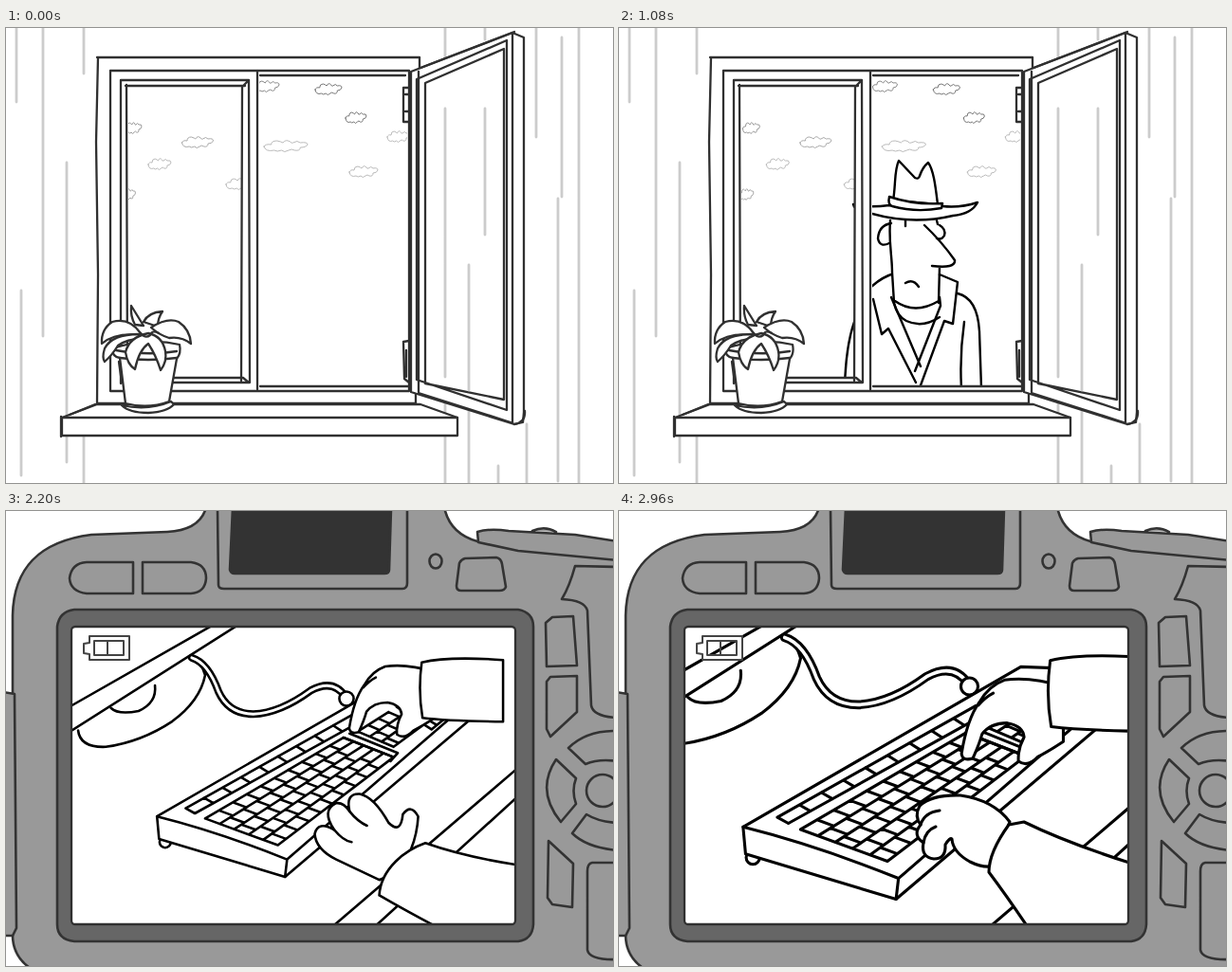
An HTML page that plays this animation: 640 px wide and 480 px high, repeating every 3.04 s.

```html
<!DOCTYPE html>
<html lang="en">
<head>
<meta charset="utf-8">
<title>Window watcher</title>
<style>
html, body { margin: 0; width: 100%; height: 100%; overflow: hidden; background: #fff; }
svg { display: block; width: 640px; height: 480px; }
path, rect, circle, ellipse { stroke-linecap: round; stroke-linejoin: round; }
.line { fill: none; }
.ink { stroke: #000; stroke-width: 2.4; fill: #fff; }
.frame { stroke: #303030; stroke-width: 2.3; fill: none; }
.white { fill: #fff; }
.wall { stroke: #ccc; stroke-width: 2.8; fill: none; }
.body { stroke: #333; stroke-width: 2.6; fill: #999; }
.thick { stroke-width: 3.1; }
text { font: bold 18px "DejaVu Sans Mono", "Noto Sans Mono", monospace; letter-spacing: -.8px; fill: #3a3a3a; }
</style>
</head>
<body>
<svg viewBox="0 0 640 480">
<defs>
  <clipPath id="panes"><path d="M129 62H249V368H129zM267 51H423V377H267z"/></clipPath>
  <clipPath id="reach"><path d="M267 51H600V377H267z"/></clipPath>
  <clipPath id="lcd"><rect x="69" y="123" width="468" height="313" rx="4"/></clipPath>
</defs>

<g id="room">
  <rect width="640" height="480" fill="#fff"/>
  <path class="wall" d="M11 0V78M39 0V325M64 142V458M16 277V472M82 0V48M82 430V480M463 0V480M488 250V480M505 0V12M505 85V218M519 462V480M549 418V480M559 0V115M586 10V178M582 180V478M604 0V480"/>
  <path fill="#fff" d="M96 31H436V396H96z"/>
  <g clip-path="url(#panes)">
    <g id="clouds"></g>
    <g id="standing" class="ink">
      <path d="M290 259Q250 272 246 308Q238 340 238 385H382L380 318Q378 285 357 280L338 260z" stroke="none"/>
      <path class="line" d="M290 259Q276 263 264 275M252 300Q239 328 238 380M357 280Q378 285 380 320L382 380M364 310Q359 345 361 380"/>
      <path d="M286 203C284 225 288 240 288 258L290 290Q293 304 303 309Q320 317 337 305L338 252L350 250L354 245L340 200z" stroke="none"/>
      <path d="M287 206Q274 208 273 222Q275 232 285 227M338 208Q345 212 343 219Q340 224 335 222"/>
      <path class="line" d="M286 203C284 225 288 240 288 258L290 290M302 203v6M335 203l1 4M322 208Q340 225 354 245Q355 254 330 251M338 252L337 290M302 269Q310 264 316 273M291 288Q312 303 337 288M290 290Q293 304 303 309Q320 317 338 305"/>
      <path class="line" d="M287 284L318 357M268 286L277 323L284 317L313 374M338 260L357 268L352 312L343 309L318 377M338 284L339 293L312 362"/>
      <path d="M247 186Q262 190 285 187L341 188Q360 190 378 184Q372 196 352 198Q310 208 267 196Q248 193 247 186z"/>
      <path d="M289 182C292 165 290 150 295 140L312 158Q316 160 317 156Q320 147 326 142C332 150 334 170 336 186z"/>
      <path d="M285 178Q283 186 288 188Q313 195 340 190L341 185Q312 187 285 178z"/>
    </g>
    <g id="hunched" class="ink">
      <path d="M300 262Q275 285 262 306V385H378L382 340L360 262z" stroke="none"/>
      <path class="line" d="M300 268L279 282V293M290 276Q276 286 264 304M382 348L378 380M311 348L326 363M318 377L348 335L365 341L345 357L330 377M346 306L318 377"/>
      <path d="M306 214H360V268H308L305 244Q293 243 291 234Q293 228 291 226Q293 217 306 218z"/>
      <path d="M250 196Q285 204 303 203L358 206Q378 207 399 206Q396 215 385 217H325Q290 215 250 202z"/>
      <path d="M308 199C311 180 312 165 316 155Q325 165 333 173Q339 166 346 159Q354 175 354 204z"/>
      <path d="M303 196Q302 204 306 205Q330 210 358 207L358 201Q330 203 303 196z"/>
    </g>
  </g>

  <g class="frame">
    <path d="M96 31H436V42M97 31L95 120L97 260L96 396H432V386M110 45H425V383H110zM265 45V381M121 55V375M121 55H256L257 374H165M127 60L128 372M126 61H252M249 62L248 372M160 369H250L256 374M249 62L256 55M268 50H421M268 378H424"/>
    <path d="M419 63H425M419 63V99H425M421 70H425M421 88H425M419 331L425 330M419 331L420 370L425 374M422 340V368"/>
    <path class="white" d="M427 46L534 5L546 10V405L545 416L536 418L427 384z"/>
    <path d="M534 5V417M536 418Q548 416 547 404M437 42L536 4M435 385L532 416"/>
    <path d="M433 54L528 13V403L433 371zM442 58L525 22V392L442 375zM435 46V384"/>
    <path class="white" d="M96 397L59 411V430H476V411L437 397z"/>
    <path d="M59 411H476M58 410V431M67 408L94 397"/>
  </g>
  <path class="wall" d="M463 85V368M488 250V382M505 85V218"/>

  <g class="frame white">
    <path d="M112 338Q112 347 120 348L126 396Q150 402 172 394L180 349Q185 343 183 334Q150 326 112 338z"/>
    <path d="M120 348Q150 352 180 348M116 340Q150 346 180 341M119 352L122 374"/>
    <path d="M122 398Q150 404 174 394L177 397Q170 405 150 406Q130 406 122 398z"/>
    <path d="M145 314L132 293Q131 304 136 313zM145 310Q150 300 165 299Q160 306 160 315z"/>
    <path d="M142 322Q130 305 112 310Q100 318 101 333Q115 321 142 324z"/>
    <path d="M140 323Q112 323 104 338Q101 348 104 352Q112 345 118 335Q128 328 142 328z"/>
    <path d="M153 316Q170 305 182 310Q194 318 195 333Q185 325 172 327Q162 324 153 316z"/>
    <path d="M150 322Q130 326 126 342Q128 355 136 360Q140 340 150 333Q158 345 163 361Q170 352 168 341Q165 325 150 322z"/>
    <path d="M142 322Q147 328 152 324Q154 318 161 322" fill="none"/>
  </g>

  <g clip-path="url(#reach)">
    <g id="camera" class="ink">
      <path d="M354 214L390 217V262L382 278H358z"/>
      <g id="lens">
        <path d="M388 230H374Q367 232 369 245Q372 258 388 256z"/>
        <path d="M375 234Q371 244 377 254" class="line"/>
        <path d="M392 221Q384 230 386 247Q387 260 394 265L408 268L412 218z"/>
        <path d="M410 218L440 215Q457 219 457 240Q454 272 435 276L410 270Q400 255 403 234z"/>
        <ellipse cx="437" cy="245" rx="18" ry="30" transform="rotate(6 437 245)"/>
        <ellipse cx="436" cy="245" rx="12" ry="25" transform="rotate(6 436 245)"/>
        <path d="M419 218Q408 244 419 271" class="line"/>
      </g>
      <path d="M355 282Q378 277 400 268L415 335Q404 349 385 347Q369 344 365 337Q357 312 355 282z"/>
      <path d="M310 246Q300 282 288 311Q275 304 264 314V328Q274 346 296 345Q326 343 340 326Q350 300 355 262L330 262z"/>
      <path d="M318 256Q318 232 328 215Q338 204 353 207Q354 214 345 219Q358 218 357 227Q359 235 353 239Q358 252 347 254Q340 256 342 264Q330 268 318 256z"/>
      <path class="line" d="M352 222Q336 222 330 233M354 237Q340 234 333 245M316 247L310 266"/>
    </g>
  </g>
</g>

<g id="back">
  <rect width="640" height="480" fill="#fff"/>
  <g class="body">
    <path d="M28 484Q6 470 7 445V110C8 60 35 32 90 25L170 22Q205 20 211-4H462Q468 24 497 32L645 48V484z"/>
    <path d="M-3 191L9 193L11 440L7 448H-3z"/>
    <path d="M555 21Q568 15 580 22M497 22Q510 18 530 21L600 25L645 32V52L540 42L498 33z"/>
    <path d="M223-3L224 78Q224 82 230 82H418Q423 82 423 76V-3"/>
    <path d="M239-3L236 62Q237 66 241 66H399Q404 66 404 62L406-3" fill="#333"/>
    <path d="M134 54V87H85Q68 85 67 71Q69 55 85 54zM144 54H195Q211 56 211 71Q210 86 195 87H144z"/>
    <ellipse cx="453" cy="53" rx="6.5" ry="7.5"/>
    <path d="M484 50L517 49Q522 50 523 56L527 80Q526 84 520 84H480Q475 84 475 79L478 55Q480 51 484 50z"/>
    <path d="M645 59L600 58Q594 80 586 93Q610 94 613 105L617 205Q619 217 645 218"/>
    <path d="M576 112L598 111L602 163L570 164L569 118zM574 175L602 174V212L574 238L570 230V180z"/>
    <path d="M593 250Q612 231 645 232V264Q625 261 611 267zM580 262L601 282Q596 295 601 309L585 328Q558 295 580 262zM597 340L612 320Q625 328 645 329V358Q612 355 597 340z"/>
    <circle cx="629" cy="295" r="17"/>
    <path d="M572 348L598 372L597 418L576 415L571 408zM645 371H618Q613 372 613 380V463Q615 474 645 473"/>
    <path fill="#666" d="M72 104H540Q556 107 556 122V436Q555 452 540 454H72Q54 452 54 436V122Q56 106 72 104z"/>
  </g>
  <rect x="69" y="122" width="468" height="314" rx="4" fill="#fff"/>
  <g clip-path="url(#lcd)">
    <g id="desk" class="ink">
      <path class="line" d="M30 270L290 105M30 242L265 108M300 461L537 258L570 230M335 469L537 285L570 255"/>
      <path class="line" d="M206 164Q213 166 217 180Q212 205 185 225Q155 245 120 250Q95 251 93 234M168 190Q170 207 152 215Q132 219 125 212"/>
      <path class="line" id="cord" d="M204 163Q220 168 230 196Q240 218 264 218Q290 217 320 195Q342 183 354 201" stroke-width="7.5"/>
      <path class="line" d="M204 163Q220 168 230 196Q240 218 264 218Q290 217 320 195Q342 183 354 201" stroke="#fff" style="stroke:#fff;stroke-width:2.8"/>
      <circle cx="355" cy="203" r="7"/>
      <circle cx="178" cy="343" r="5.5"/>
      <path d="M170 318L397 187L482 190V218L295 377L172 340z"/>
      <path d="M170 318Q230 333 297 360L462 217M297 360L295 377" class="line"/>
      <path id="keys" class="line"/>
      <path class="line" d="M358 237L405 256M352 241L401 260M405 256L398 264"/>
    </g>
    <g id="lowA" class="ink">
      <path d="M387 380L345 360Q325 350 324 335Q327 322 343 331Q330 312 345 305Q352 304 358 313Q354 295 368 296Q382 299 396 324Q408 336 410 316Q418 305 425 318Q424 335 418 350L405 372z"/>
      <path class="line" d="M343 331Q352 342 360 343M358 313Q366 323 375 327"/>
      <path d="M387 395Q388 377 403 362Q415 350 432 344Q480 361 550 369V450H490Q430 420 387 395z"/>
    </g>
    <g id="lowB" class="ink thick">
      <path d="M412 328Q395 305 360 300Q330 299 317 311Q311 322 318 331Q309 342 321 350Q318 365 332 367Q345 367 344 352Q349 344 351 346Q352 360 370 370Q382 376 392 375z"/>
      <path class="line" d="M318 331Q322 318 338 316M321 350Q323 337 334 333"/>
      <path d="M390 381Q390 360 411 331L427 328Q480 354 570 381V460H445Q414 413 390 381z"/>
    </g>
    <g id="upA" class="ink">
      <path d="M442 156L402 157Q382 160 383 167L379 179Q370 190 368 200Q357 212 359 219Q364 223 370 218Q380 211 386 202Q396 193 404 197Q403 202 398 206Q398 216 407 214L415 205Q416 216 428 222Q437 228 438 212z"/>
      <path class="line" d="M383 167Q390 164 396 166M379 183Q388 178 391 181M404 202Q412 203 413 208"/>
      <path d="M439 154Q490 148 550 166V246Q500 222 435 213Q439 182 439 154z"/>
    </g>
    <g id="upB" class="ink thick">
      <path id="palm" d="M475 163Q440 152 412 156Q395 162 385 180Q372 198 366 235Q367 243 378 240Q385 225 388 214Q397 202 415 202Q432 205 433 217Q426 230 427 243Q437 250 448 238Q460 232 475 222zM384 183Q392 174 400 170"/>
      <path id="cuff" d="M466 154Q500 146 570 151V230Q500 229 467 225Q461 190 466 154z"/>
    </g>
  </g>
  <rect x="69" y="122" width="468" height="314" rx="4" class="frame"/>
  <path d="M88 132H130V157H88V151L82 150V140L88 139zM93 137V152H124V137z" fill="#fff" fill-rule="evenodd" stroke="#444" stroke-width="2"/>
  <path d="M107 137V152" stroke="#444" stroke-width="2"/>
  <g id="rec">
    <rect x="479" y="137.500" width="8" height="7.500" rx="2" fill="none" stroke="#3a3a3a" stroke-width="2.2"/>
    <text x="496" y="148">REC</text>
  </g>
</g>
</svg>

<script>
const LOOP = 3040, STEP = 40, CUT = 1720;
const $ = id => document.getElementById(id);
const show = (id, on) => $(id).setAttribute('display', on ? 'inline' : 'none');
const place = (id, value) => $(id).setAttribute('transform', value);
const shift = (id, [x, y]) => place(id, `translate(${x} ${y})`);

// Piecewise linear track of [time, ...values]
function track(rows, t) {
  if (t <= rows[0][0]) return rows[0].slice(1);
  for (let i = 1; i < rows.length; i++) {
    const a = rows[i - 1], b = rows[i];
    if (t <= b[0]) {
      const k = (t - a[0]) / (b[0] - a[0]);
      return a.slice(1).map((v, j) => v + (b[j + 1] - v) * k);
    }
  }
  return rows[rows.length - 1].slice(1);
}

// x, y, width, grey
const clouds = [
  [134, 106, 18, '#999'], [202, 121, 33, '#aaa'], [162, 144, 24, '#bbb'], [246, 165, 28, '#bbb'],
  [129, 176, 15, '#aaa'], [275, 62, 26, '#888'], [340, 65, 28, '#777'], [369, 95, 22, '#777'],
  [295, 125, 46, '#bbb'], [414, 115, 24, '#bbb'], [377, 152, 30, '#bbb']
];
const puff = 'M-15 0q1-3 5-2q0-4 4-4q3 1 4 2q2-4 5-1q1 2 2 1q3-3 5 0q5-1 5 2q-1 3-5 3q0 4-4 3q-2-2-4 0q-3 3-5 0q-3 2-5 0q-6 2-7-4z';
$('clouds').innerHTML = clouds.map(([x, y, w, c]) =>
  `<path d="${puff}" transform="translate(${x} ${y}) scale(${w / 30} 1)" fill="none" stroke="${c}" vector-effect="non-scaling-stroke"/>`).join('');

// Skewed grid of keys; corners run around the block
function keyGrid([a, b, c, d], rows, cols) {
  const at = (u, v) => [0, 1].map(i =>
    ((a[i] * (1 - u) + b[i] * u) * (1 - v) + (d[i] * (1 - u) + c[i] * u) * v).toFixed(1)).join(' ');
  const seg = (u, v, u2, v2) => `M${at(u, v)}L${at(u2, v2)}`;
  let d2 = seg(0, 0, 0, 1) + seg(1, 0, 1, 1);
  for (let r = 0; r <= rows; r++) {
    d2 += seg(0, r / rows, 1, r / rows);
    for (let k = 1; k < cols && r < rows; k++) {
      const u = (k - (r * .37) % 1 * .6) / cols;
      d2 += seg(u, r / rows, u, (r + 1) / rows);
    }
  }
  return d2;
}
$('keys').setAttribute('d',
  keyGrid([[217, 320], [352, 241], [401, 260], [288, 346]], 5, 10) +
  keyGrid([[198, 310], [360, 219], [369, 225], [207, 315]], 1, 9) +
  keyGrid([[366, 235], [396, 216], [428, 230], [401, 250]], 3, 3) +
  keyGrid([[404, 211], [432, 194], [466, 210], [438, 233]], 3, 3));
$('cord').style.strokeWidth = 7.5;

const zoomTrack = [[2120, 1], [2320, 1.2], [2480, 1.31], [2640, 1.29]];
const walkTrack = [[0, -262], [600, 0]];
const duckTrack = [[1120, 0, 0], [1400, 13, 16]];
const raiseTrack = [[1120, -20, 190], [1360, 0, -4], [1440, 0, 0]];
const lensTrack = [[1480, 0], [1680, 40]];
const tapTrack = [[1720, 3, -8], [1800, -2, 0], [1880, 2, -5], [1920, 0, 0]];
const palmTrack = [[2160, 8, -18], [2320, 8, 0], [2480, 0, 0], [2560, 2, -7], [2640, 0, 6], [2720, -2, 8], [2800, 0, -4], [2880, -4, 10], [2960, -4, 21]];
const cuffTrack = [[2160, 0, -18], [2320, 3, -13], [2480, 0, 0], [2560, 0, -3], [2720, -4, 1], [2800, -3, -4], [2960, -9, 2]];
const lowTrack = [[2720, 5, 6], [2800, -4, -6], [2880, 3, 4], [2960, 0, 0]];

const zoom = (s, x = 0, y = 0) => `translate(${305 + x} ${265 + y}) scale(${s}) translate(-305 -265)`;

function drawRoom(t) {
  shift('clouds', [t * .005, 0]);
  const [walk] = track(walkTrack, t);
  const bob = t < 600 ? -4 * Math.abs(Math.sin(t / 600 * Math.PI * 3)) : 0;
  const [dx, dy] = track(duckTrack, t);
  shift('standing', [walk + dx, bob + dy]);
  show('standing', t > 0 && t < 1320);
  show('hunched', t >= 1320);
  show('camera', t >= 1160);
  shift('camera', track(raiseTrack, t));
  shift('lens', [track(lensTrack, t)[0], 0]);
}

function drawBack(t) {
  const [s] = track(zoomTrack, t);
  const early = t < 2160, late = t >= 2720;
  place('desk', zoom(s));
  place('lowA', zoom(s));
  place('upA', zoom(s, ...track(tapTrack, t)));
  place('upB', zoom(s / 1.31));
  shift('palm', track(palmTrack, t));
  shift('cuff', track(cuffTrack, t));
  shift('lowB', track(lowTrack, t));
  show('upA', early);
  show('upB', !early);
  show('lowA', !late);
  show('lowB', late);
  show('rec', early || late && t < 2960);
}

function draw(now) {
  const t = Math.floor((now % LOOP) / STEP) * STEP;
  show('room', t < CUT);
  show('back', t >= CUT);
  if (t < CUT) drawRoom(t); else drawBack(t);
}

const start = performance.now();
function tick() {
  draw(performance.now() - start);
  requestAnimationFrame(tick);
}
tick();
</script>
</body>
</html>
```
